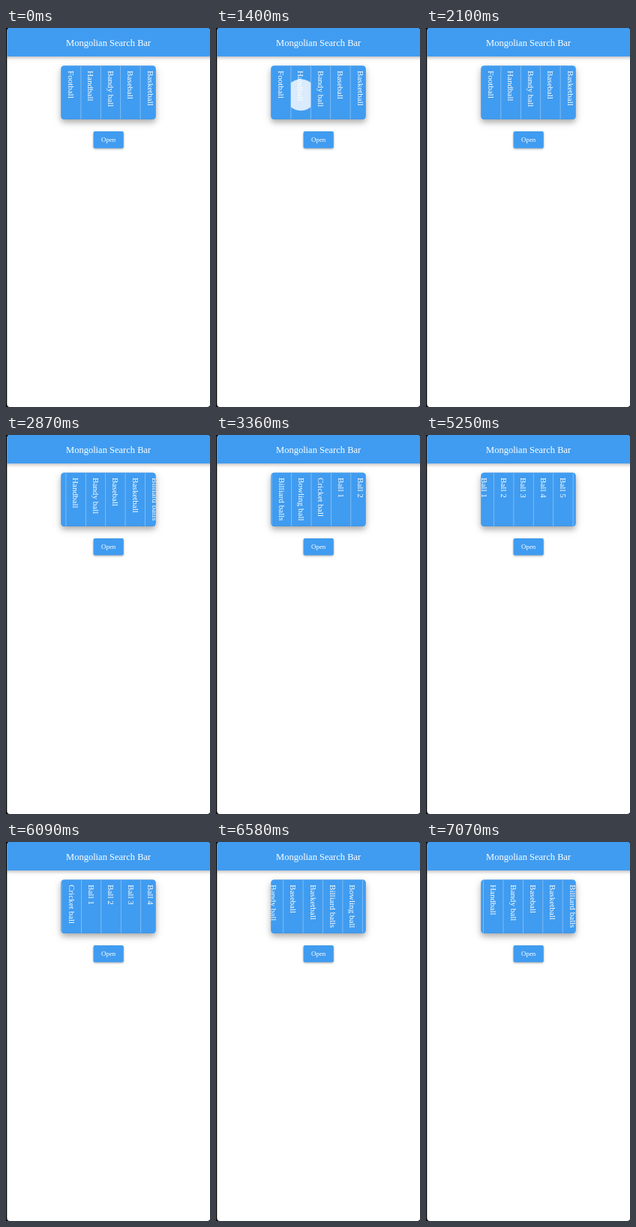
Write an HTML page with a canvas that moves like this. It is 272 px wide and 506 px high and loops after 7.14 s.

```html
<!DOCTYPE html>
<html lang="en">
<head>
<meta charset="utf-8">
<title>Search bar</title>
<style>
html, body { margin: 0; width: 100%; height: 100%; overflow: hidden; background: #fff; }
canvas { display: block; width: 272px; height: 506px; }
</style>
</head>
<body>
<canvas id="stage" width="272" height="506"></canvas>
<script>
const ctx = document.getElementById('stage').getContext('2d');
const LOOP = 7140, STEP = 70;
const BLUE = '#409cf0';
const SERIF = '"Liberation Serif", "Times New Roman", serif';
const CARD = { x: 73.5, y: 50.6, w: 126, h: 71.2, r: 4 };
const ITEM_W = 26.4;
const items = ['Football', 'Handball', 'Bandy ball', 'Baseball', 'Basketball',
  'Billiard balls', 'Bowling ball', 'Cricket ball',
  ...Array.from({ length: 8 }, (_, i) => `Ball ${i + 1}`)];

const taps = [
  { item: 0, start: 910, end: 1050 },
  { item: 1, start: 1400, end: 1610 },
  { item: 2, start: 1890, end: 2100 },
  { item: 10, start: 5040, end: 5250 },
  { item: 11, start: 5530, end: 5670 }
];

// Scroll keys: time, offset, velocity in px per ms
const scrollKeys = [
  [0, 0, 0], [2450, 0, 0], [2870, 20, 0.12], [3220, 100, 0.25],
  [3920, 185.7, 0], [4060, 185.7, 0.12], [4410, 220.6, 0],
  [5810, 220.6, 0], [6580, 63, -0.17], [7070, 23.3, -0.03], [LOOP, 22, 0]
];

function scrollAt(t) {
  const i = Math.max(1, scrollKeys.findIndex(k => k[0] >= t));
  const [t0, p0, v0] = scrollKeys[i - 1];
  const [t1, p1, v1] = scrollKeys[i];
  if (p0 === p1) return p0;
  const d = t1 - t0, u = (t - t0) / d, n = 1 - u;
  return n * n * ((1 + 2 * u) * p0 + u * d * v0) +
         u * u * ((3 - 2 * u) * p1 - n * d * v1);
}

function roundBox(x, y, w, h, r) {
  ctx.beginPath();
  ctx.roundRect(x, y, w, h, r);
}

function raised(x, y, w, h, r, shadows) {
  ctx.save();
  ctx.fillStyle = BLUE;
  for (const [alpha, blur, dy] of shadows) {
    ctx.shadowColor = `rgba(0,0,0,${alpha})`;
    ctx.shadowBlur = blur;
    ctx.shadowOffsetY = dy;
    roundBox(x, y, w, h, r);
    ctx.fill();
  }
  ctx.restore();
}

function label(text, x, y, size, align) {
  ctx.font = `${size}px ${SERIF}`;
  ctx.textAlign = align;
  ctx.fillStyle = '#fff';
  ctx.fillText(text, x, y);
}

function drawRipple(x, tap, t) {
  const age = t - tap.start;
  const fade = 1 - age / (tap.end - tap.start);
  ctx.save();
  ctx.beginPath();
  ctx.rect(x, CARD.y, ITEM_W, CARD.h);
  ctx.clip();
  ctx.fillStyle = `rgba(255,255,255,${0.8 * fade})`;
  ctx.beginPath();
  ctx.arc(x + ITEM_W / 2, 89.3, 21 + age * 0.13, 0, Math.PI * 2);
  ctx.fill();
  ctx.restore();
}

function drawItem(text, x) {
  ctx.fillStyle = 'rgba(255,255,255,0.4)';
  ctx.fillRect(x + ITEM_W - 0.4, CARD.y, 0.8, CARD.h);
  ctx.save();
  ctx.translate(x + 9.5, 57);
  ctx.rotate(Math.PI / 2);
  label(text, 0, 0, 11.1, 'left');
  ctx.restore();
}

function drawCard(t) {
  const { x, y, w, h, r } = CARD;
  raised(x, y, w, h, r, [[0.12, 14, 4], [0.25, 7, 4]]);
  ctx.save();
  roundBox(x, y, w, h, r);
  ctx.clip();
  const offset = scrollAt(t);
  const tap = taps.find(p => t >= p.start && t < p.end);
  items.forEach((text, i) => {
    const left = x + i * ITEM_W - offset;
    if (left > x + w || left + ITEM_W < x - 1) return;
    if (tap && tap.item === i) drawRipple(left, tap, t);
    drawItem(text, left);
  });
  ctx.restore();
}

function draw(t) {
  ctx.fillStyle = '#000';
  ctx.fillRect(0, 0, 272, 506);
  ctx.save();
  roundBox(1.3, 0, 271, 506, 4);
  ctx.clip();
  ctx.fillStyle = '#fff';
  ctx.fillRect(0, 0, 272, 506);
  raised(-10, -10, 292, 48, 0, [[0.3, 5, 1.5]]);
  label('Mongolian Search Bar', 136.6, 24.2, 12.5, 'center');
  drawCard(t);
  raised(116.6, 138, 40.2, 22.6, 2, [[0.35, 3, 1]]);
  label('Open', 136.7, 152.4, 8.9, 'center');
  ctx.restore();
}

function frame() {
  const t = performance.now() % LOOP;
  draw(Math.floor(t / STEP) * STEP);
  requestAnimationFrame(frame);
}
frame();
</script>
</body>
</html>
```
